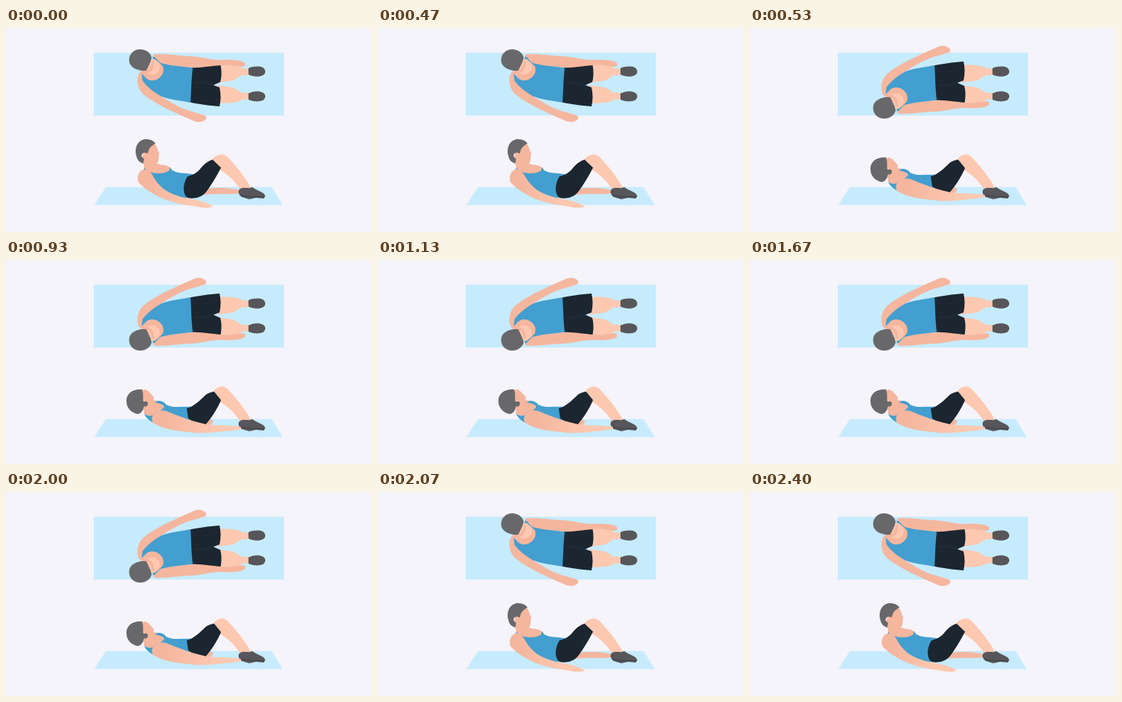
Animation of 480 by 268 pixels, one loop 2470 ms. Source, as an HTML page:

```html
<!DOCTYPE html>
<html lang="en">
<head>
<meta charset="utf-8">
<title>Heel touch exercise</title>
<style>
html, body { margin: 0; width: 100%; height: 100%; overflow: hidden; background: #f4f4fa; }
svg { display: block; width: 100%; height: 100%; }
.mat { fill: #c6ebfd; }
.skin { fill: #fdc8b0; }
.shade { fill: #f5b69e; }
.arm { fill: url(#armTone); }
.shirt { fill: #429fcf; }
.shorts { fill: #1b2630; }
.hair { fill: #68686a; }
.shoe { fill: #57565a; }
.line { fill: none; stroke: #2c3942; stroke-width: .7; }
</style>
</head>
<body>
<svg viewBox="0 0 480 268">
  <defs>
    <linearGradient id="armTone">
      <stop offset=".15" stop-color="#f5b69e"/>
      <stop offset=".7" stop-color="#fdc8b0"/>
    </linearGradient>
    <g id="leg">
      <path class="skin" d="M278 49 C289 47 299 49 307 51 L309 53 L320 53.5 V61.5 L309 62 C304 65 299 70 290 70 L278 72Z"/>
      <path class="shoe" d="M318 53 C323 50 333 50 337 52 C341 55 341 60 337 62 C332 65 323 64 318 61Z"/>
    </g>
  </defs>

  <path class="mat" d="M115 32.5H364.5V115H115Z"/>
  <path class="mat" d="M131 209H348L363 232.5H116Z"/>

  <g id="top">
    <use href="#leg"/>
    <use href="#leg" transform="matrix(1 0 0 -1 0 147)"/>
    <path class="shorts" d="M243 52 C255 49 269 48 281 47 C283 55 283 64 281 71 L272 75 L280 78 C282 86 282 95 280 103 C266 102 252 100 241 97.5Z"/>
    <path class="line" d="M272 75 C262 72 255 70 248 73"/>
    <path class="shade" d="M193 35 C203 33 222 36 238 37 C254 37 268 42 281 42 C295 41 307 42 312 45 C316 48 313 51 308 51 L291 48.5 C273 49 254 53 242 52 L197 48Z"/>
    <path class="shade" d="M174 60 L190 40 L197 40 L209 52 L206 66 L192 73 L177 70Z"/>
    <path class="shade" d="M173 63 C171 72 174 80 178 85 C188 95 212 107 230 115 L245 121.5 C250 124 256 124 259 122 C263 121 264 117 261 115 C255 113 248 111 241 109 C234 107 228 104 222 101 L205 91 L190 78 L184 66 C180 58 175 57 173 63Z"/>
    <path class="shirt" d="M193 37 C197 39 199 44 203 46 C216 50 231 50 245 52.5 C243 66 243 84 242 98 C227 95 214 94 204 90 C195 85 184 77 179 69 L178 60 L182 64 C186 70 194 70 199 67 C205 63 208 58 206 51 C203 46 196 42 192 40Z"/>
    <path class="skin" d="M182 56 C186 62 194 63 199 58 C204 53 202 45 195 41 L188 40Z"/>
    <path class="shade" d="M181 55 C186 57 190 52 191 43 L194 44 C195 53 190 60 183 59Z"/>
    <path class="hair" d="M161.5 43 C161 34 168 28 176 28 C184 28 190 33 191 39 C190 44 187 50 184 56 C175 57 162 53 161.5 43Z"/>
  </g>

  <g id="rise">
    <path class="shade" d="M261 212 C279 208 296 211 307 213 L308 217 C294 219 275 217 260 219Z"/>
    <path class="skin" d="M270 173 C276 165 287 164 292 171 C303 183 314 196 321 210 L308 213 C302 204 293 193 280 186Z"/>
    <path class="shoe" d="M306 212 C312 208 317 212 323 209 C329 214 339 215 340 221 L338 224 L328 223 L319 225 L309 222 C305 219 304 215 306 212Z"/>
    <path class="line" d="M307 219 C316 223 327 221 339 222"/>
    <path class="shirt" d="M181 184 L200 187 L215 183 L218 187 C226 192 239 190 248 193 L238 207 L237 224 C222 222 205 213 196 202 L180 190Z"/>
    <path class="shade" d="M181 177 L195 177 C199 180 206 179 211 181 C215 182 216 186 213 188 C206 192 192 192 185 187 L181 184Z"/>
    <path class="shorts" d="M238 195 C245 193 249 191 254 186 C259 179 266 174 271 173 L282 183.5 C276 195 269 207 262 216 C256 223 246 225 238 223 C232 219 231 206 238 195Z"/>
    <path class="arm" d="M180 186 C173 188 171 198 174 203 C182 212 200 223 214 227 C227 232 243 233 254 235.5 C260 237 267 236 271 235 C268 231 262 230 257 228 C246 225 238 224 230 222 C220 219 210 215 204 209 C198 203 195 199 192 193 C189 188 185 185 180 186Z"/>
    <path class="shade" d="M181 162 L186 153 C191 151 196 151 197 155 L201 165 L200 169 C201 174 199 179 194 180 L181 181 L178 171Z"/>
    <path class="hair" d="M171 168 C168 157 173 147 183 146 C190 146 195 149 196 152 C191 154 187 158 186 165 C181 162 177 165 178 169 L181 172 L180 178 C174 176 172 173 171 168Z"/>
  </g>

  <g id="reach">
    <path class="shade" d="M255 213 L267 209 L272 212 L268 217 L257 217Z"/>
    <path class="skin" d="M272 173 C276 165 287 164 292 171 C303 183 314 196 321 210 L308 213 C302 204 293 193 280 186Z"/>
    <path class="shoe" d="M306 212 C312 208 317 212 323 209 C329 214 339 215 340 221 L338 224 L328 223 L319 225 L309 222 C305 219 304 215 306 212Z"/>
    <path class="line" d="M307 219 C316 222 327 221 339 222"/>
    <path class="shade" d="M180 187 L193 184 L203 186 L207 195 L192 207 L181 202Z"/>
    <path class="shirt" d="M195 187 C201 183 207 186 210 190 C219 195 231 192 247 193 L241 211 C224 214 207 217 194 214 C187 211 183 206 181 202 C188 206 192 206 196 200 C202 198 207 196 207 192 C203 188 199 188 195 187Z"/>
    <path class="shorts" d="M237 195 C247 192 255 184 262 177 C267 174 270 173 273 173 L282 184 C277 196 269 208 262 216 C253 217 244 212 239 208Z"/>
    <path class="arm" d="M201 198 C193 199 189 208 193 214 C205 222 225 225 240 226 C256 229 277 226 296 224 L308 222 L308 219 C295 217 277 218 263 216 C249 213 237 209 227 205 C217 202 209 196 201 198Z"/>
    <path class="shade" d="M177 171 C183 168 187 172 190 176 L194 180 L193 188 L187 193 L178 190Z"/>
    <path class="hair" d="M158 186 C157 176 166 169 178 170 C181 175 179 181 180 186 L185 186 C188 190 184 194 181 192 C180 198 177 203 171 202 C164 200 158 194 158 186Z"/>
  </g>
</svg>
<script>
const LOOP = 2470, DOWN = 530, UP = 2070;
const el = id => document.getElementById(id);
const above = el("top"), rise = el("rise"), reach = el("reach");
const show = (node, on) => node.setAttribute("visibility", on ? "visible" : "hidden");

function draw(ms) {
  const t = ms % LOOP;
  const down = t >= DOWN && t < UP;
  // Seen from above, the second pose is the first one mirrored.
  above.setAttribute("transform", down ? "matrix(1 0 0 -1 0 147)" : "");
  show(rise, !down);
  show(reach, down);
}

let start = null;
function tick(now) {
  if (start === null) start = now;
  draw(now - start);
  requestAnimationFrame(tick);
}
draw(0);
requestAnimationFrame(tick);
</script>
</body>
</html>
```
